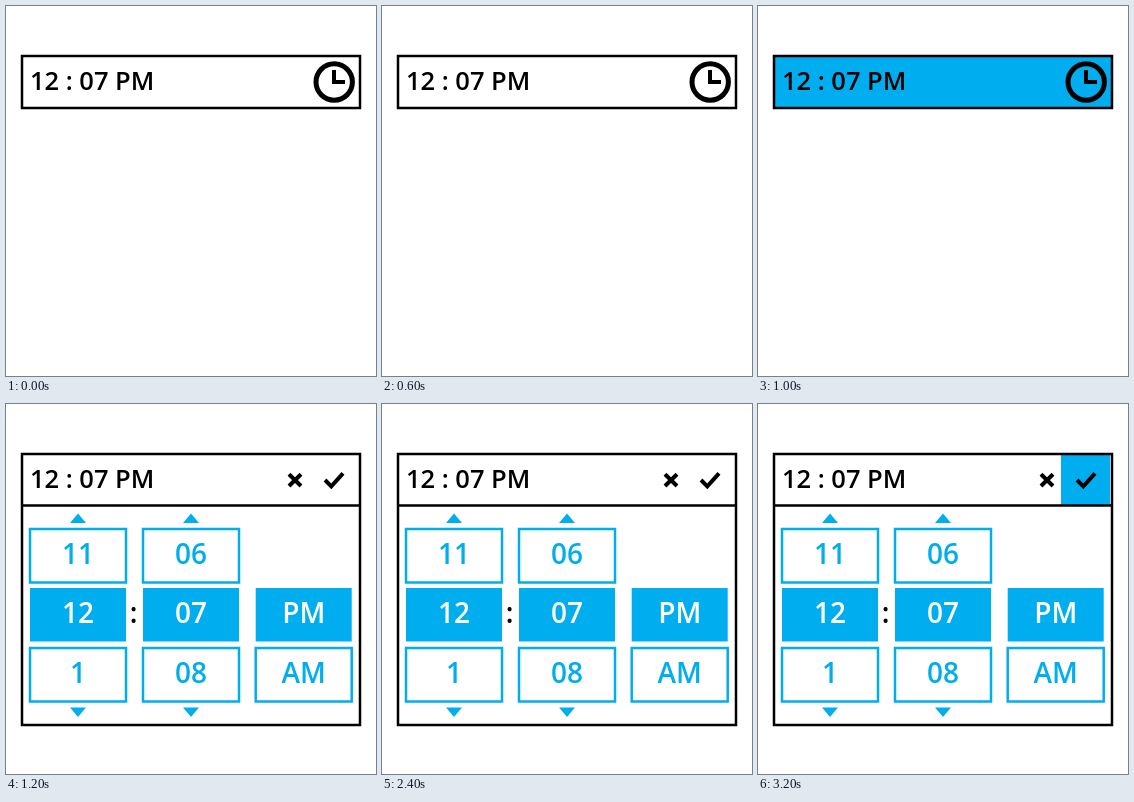
Write an HTML page that moves like this. It is 370 px wide and 370 px high and loops after 3400 ms.

```html
<!DOCTYPE html>
<html lang="en">
<head>
<meta charset="utf-8">
<title>Time picker</title>
<style>
  html, body { margin: 0; width: 100%; height: 100%; overflow: hidden; background: #fff; }
  svg { display: block; width: 100%; height: 100%; }
  text { font: 600 25.5px "Open Sans", "Noto Sans", sans-serif; }
  .cell text, .colon { font-size: 28px; text-anchor: middle; }
  .line { fill: none; stroke: #000; stroke-width: 2.5; }
  .cell rect { fill: #fff; stroke: #00adef; stroke-width: 2.5; }
  .cell text, .blue { fill: #00adef; }
  .cell.selected rect { fill: #00adef; stroke: none; }
  .cell.selected text { fill: #fff; }
</style>
</head>
<body>
<svg viewBox="0 0 370 370">
  <g id="closed">
    <rect id="pressed" class="blue" x="16" y="50" width="338" height="52"/>
    <rect class="line" x="16" y="50" width="338" height="52"/>
    <g fill="none" stroke="#000">
      <circle cx="328.2" cy="76" r="18.2" stroke-width="5"/>
      <path d="M328 64V76H339" stroke-width="4"/>
    </g>
  </g>
  <g id="open">
    <rect id="confirm" class="blue" x="303" y="51" width="49" height="50"/>
    <path class="line" d="M16 50H354V321H16ZM16 101.5H354"/>
    <path d="M283 70.2L295 82M295 70.2L283 82M319 76L325.3 82.3L337 69.3"
          fill="none" stroke="#000" stroke-width="4"/>
    <g id="picker"></g>
    <text class="colon" x="127.7" y="219">:</text>
  </g>
  <text x="24" y="83.6">12 : 07 PM</text>
</svg>
<script>
const byId = id => document.getElementById(id);
const show = (id, visible) => byId(id).setAttribute("visibility", visible ? "visible" : "hidden");

const columns = [
  { x: 72, labels: ["11", "12", "1"], arrows: true },
  { x: 185, labels: ["06", "07", "08"], arrows: true },
  { x: 297.7, labels: ["", "PM", "AM"] },
];
const rows = [
  { top: 125, baseline: 160 },
  { top: 184, baseline: 219 },
  { top: 244, baseline: 279 },
];

function cell(x, row, label) {
  if (!label) return "";
  const { top, baseline } = rows[row];
  return `<g class="cell ${row === 1 ? "selected" : ""}">
    <rect x="${x - 48}" y="${top}" width="96" height="53.5"/>
    <text x="${x}" y="${baseline}">${label}</text></g>`;
}

const arrow = (x, tip, base) =>
  `<path class="blue" d="M${x - 8} ${base}h16L${x} ${tip}Z"/>`;

byId("picker").innerHTML = columns.map(({ x, labels, arrows }) =>
  labels.map((label, row) => cell(x, row, label)).join("") +
  (arrows ? arrow(x, 109.5, 119) + arrow(x, 313, 303.5) : "")
).join("");

function draw() {
  const t = performance.now() % 3400;
  const open = t >= 1200;
  show("closed", !open);
  show("pressed", !open && t >= 1000);
  show("open", open);
  show("confirm", t >= 3200);
  requestAnimationFrame(draw);
}
draw();
</script>
</body>
</html>
```
